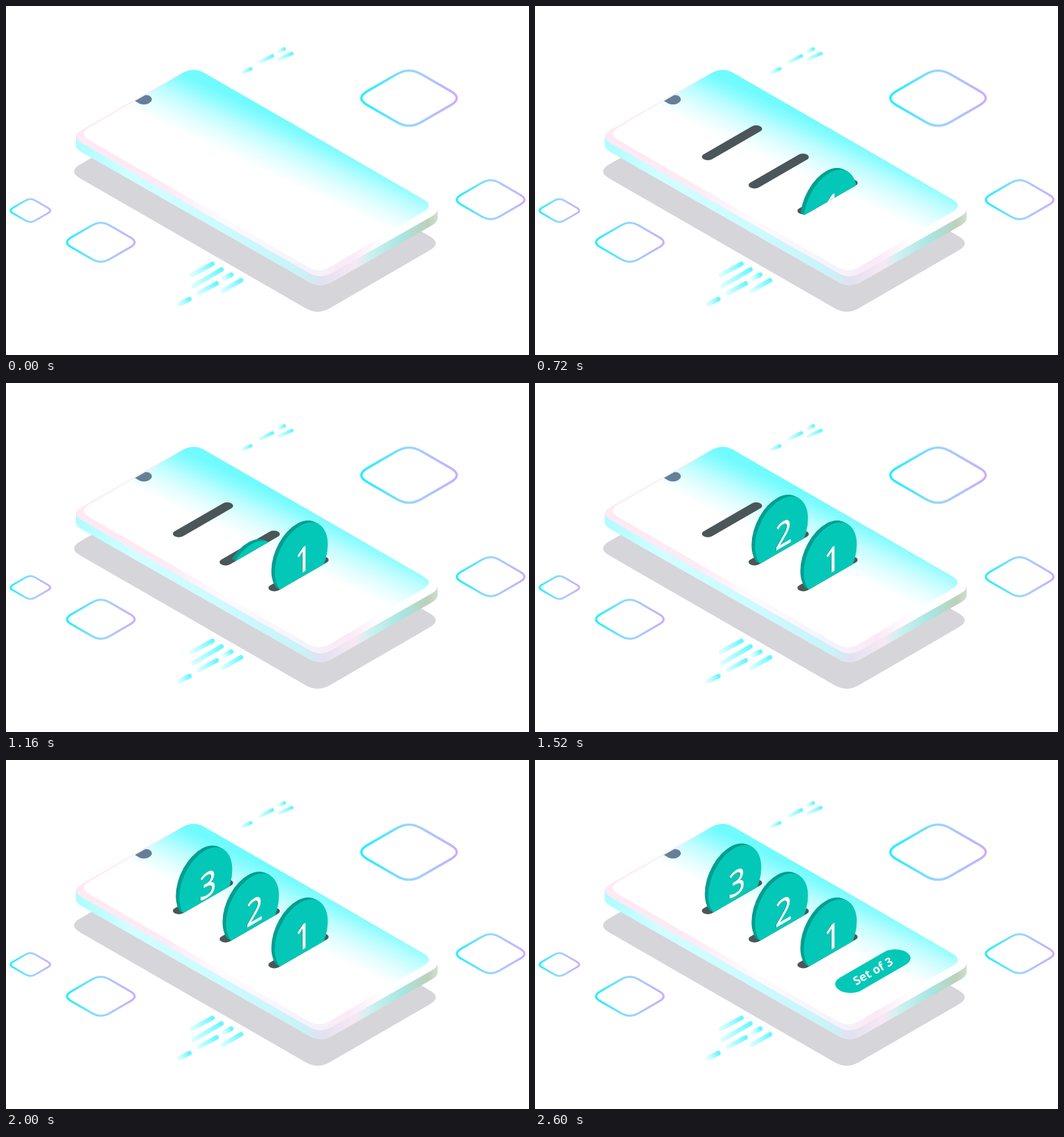
Recreate the animation shown at these times as an HTML page with a canvas. Size 750x500 px, loop 3.48 s.

```html
<!DOCTYPE html>
<html lang="en">
<head>
<meta charset="utf-8">
<title>Three coins</title>
<style>
  html, body { margin: 0; width: 100%; height: 100%; overflow: hidden; background: #fff; }
  canvas { display: block; width: 750px; height: 500px; }
</style>
</head>
<body>
<canvas id="stage" width="750" height="500"></canvas>
<script>
const canvas = document.getElementById('stage');
const ctx = canvas.getContext('2d');
const LOOP = 3480, STEP = 40, RISE = 560, HIDDEN = 78;
const FONT = '"Open Sans", "Noto Sans", sans-serif';
const SLOPE = 0.577, TEAL = '#04c8b7', RIM = '#039f91';

// Back to front: slot centre, label, start of the rise
const coins = [
  { x: 282.5, y: 196, label: '3', start: 1560 },
  { x: 349.5, y: 236.5, label: '2', start: 960 },
  { x: 419.5, y: 273.5, label: '1', start: 430 }
];

const progress = (t, start, length) => Math.min(1, Math.max(0, (t - start) / length));
const easeInOut = p => p < 0.5 ? 4 * p ** 3 : 1 - 4 * (1 - p) ** 3;

function gradient(c, x0, y0, x1, y1, stops) {
  const g = c.createLinearGradient(x0, y0, x1, y1);
  stops.forEach(([at, color]) => g.addColorStop(at, color));
  return g;
}

// Polygon whose corners are cut `cut` pixels along each edge and curved
function softPolygon(c, points, cut) {
  const n = points.length;
  const toward = ([ax, ay], [bx, by]) => {
    const k = cut / Math.hypot(bx - ax, by - ay);
    return [ax + (bx - ax) * k, ay + (by - ay) * k];
  };
  c.beginPath();
  points.forEach((p, i) => {
    c.lineTo(...toward(p, points[(i + n - 1) % n]));
    c.quadraticCurveTo(...p, ...toward(p, points[(i + 1) % n]));
  });
  c.closePath();
}

function diamond(c, x, y, half, cut, width) {
  const a = half + 0.43 * cut, b = a * SLOPE;
  softPolygon(c, [[x - a, y], [x, y - b], [x + a, y], [x, y + b]], cut);
  c.lineWidth = width;
  c.strokeStyle = gradient(c, x - half, y, x + half, y,
    [[0, '#1cf0ff'], [0.5, '#98d6ff'], [1, '#c9acff']]);
  c.stroke();
}

function dash(c, x0, y0, x1, y1, width) {
  c.lineWidth = width;
  c.lineCap = 'round';
  c.strokeStyle = gradient(c, x0, y0, x1, y1, [[0, '#d8feff'], [0.6, '#9afaff'], [1, '#66f6ff']]);
  c.beginPath();
  c.moveTo(x0, y0);
  c.lineTo(x1, y1);
  c.stroke();
}

// Pill lying flat on the screen plane
function flatPill(x, y, half, radius, color) {
  ctx.save();
  ctx.transform(0.866, -0.5, 0.866, 0.5, x, y);
  ctx.beginPath();
  ctx.roundRect(-half, -radius, 2 * half, 2 * radius, radius);
  ctx.restore();
  ctx.fillStyle = color;
  ctx.fill();
}

function drawPhone(c) {
  softPolygon(c, [[89, 237], [267, 134], [625, 340], [447, 443]], 20);
  c.fillStyle = '#d6d5da';
  c.fill();

  const top = [[92, 187], [269, 86], [627, 292], [451, 392]];
  c.fillStyle = gradient(c, 100, 0, 620, 0, [
    [0, '#aefcff'], [0.15, '#d2feff'], [0.4, '#cdfbff'], [0.62, '#c9f3f7'], [0.68, '#e2e1f0'],
    [0.77, '#f8e8f4'], [0.81, '#cdf1ef'], [0.9, '#a9e5e1'], [0.97, '#bdd0ba'], [1, '#cfe0d2']
  ]);
  for (let d = 13; d > 0; d--) {
    softPolygon(c, top.map(([x, y]) => [x, y + d]), 19);
    c.fill();
  }
  softPolygon(c, top, 19);
  c.fillStyle = gradient(c, 100, 0, 620, 0,
    [[0, '#ffe9f3'], [0.25, '#fdeaf4'], [0.4, '#fffafd'], [0.65, '#f4f2fa'], [0.75, '#fbe9f6'], [0.85, '#fff'], [1, '#fff']]);
  c.fill();

  softPolygon(c, [[104, 183], [269, 87], [614, 286], [449, 383]], 18);
  c.fillStyle = '#fff';
  c.fill();
  c.save();
  c.clip();
  c.beginPath();
  [[160, 151], [269, 80], [625, 285], [548, 325]].forEach(p => c.lineTo(...p));
  c.fillStyle = gradient(c, 430, 178, 397, 249,
    [[0, '#70fbff'], [0.18, '#8cfcff'], [0.42, '#bcfdff'], [0.7, '#e2feff'], [1, '#fff']]);
  c.fill();
  c.restore();

  c.fillStyle = '#667f98';
  c.beginPath();
  c.moveTo(185, 136);
  c.lineTo(200, 127.5);
  c.bezierCurveTo(206, 127.5, 210, 131, 209, 135);
  c.bezierCurveTo(207, 141, 196, 143, 190, 139);
  c.closePath();
  c.fill();
}

function drawScenery(c) {
  c.fillStyle = '#fff';
  c.fillRect(0, 0, 750, 500);
  diamond(c, 578, 132, 68.5, 20, 3.2);
  diamond(c, 695, 277.5, 48.5, 14, 3);
  diamond(c, 136, 338.5, 48.5, 14, 3);
  diamond(c, 35, 293, 28.5, 8, 2.6);
  [[340, 95, 351, 90], [365, 80, 382, 71.5], [392, 65, 399, 61.5], [392, 76, 410, 68]]
    .forEach(d => dash(c, ...d, 5));
  drawPhone(c);
  [[267, 385, 296, 369.5], [269, 401, 309, 377.5], [313, 390, 323, 385],
   [277, 411, 302, 397.5], [311, 408, 337, 393], [249, 427, 263, 420]]
    .forEach(d => dash(c, ...d, 6.5));
}

function disc(x, y, color) {
  ctx.save();
  ctx.transform(38, -20, 0, 48, x, y);
  ctx.beginPath();
  ctx.arc(0, 0, 1, 0, Math.PI * 2);
  ctx.restore();
  ctx.fillStyle = color;
  ctx.fill();
}

// Keeps what rises above the slot's front edge
function clipAboveSlot(x, y) {
  ctx.beginPath();
  ctx.moveTo(x - 60, y + 7 + 60 * SLOPE);
  ctx.lineTo(x + 60, y + 7 - 60 * SLOPE);
  ctx.lineTo(x + 60, y - 150);
  ctx.lineTo(x - 60, y - 150);
  ctx.clip();
}

function drawCoin({ x, y, label, start }, t) {
  const p = easeInOut(progress(t, start, RISE));
  if (p === 0) return;
  const cx = x + 4, cy = y - 22 + HIDDEN * (1 - p);
  // Layers from the back face to the front one
  for (let d = 5; d >= 0; d--) {
    ctx.save();
    ctx.translate(-d, -d / 2);
    clipAboveSlot(x, y);
    disc(cx, cy, d ? RIM : TEAL);
    ctx.restore();
  }
  ctx.save();
  clipAboveSlot(x, y);
  ctx.transform(0.866, -0.5, 0, 1, cx + 3, cy + 2);
  ctx.font = '49px ' + FONT;
  ctx.textAlign = 'center';
  ctx.textBaseline = 'alphabetic';
  ctx.fillStyle = '#078d82';
  ctx.fillText(label, -1.5, 16.5);
  ctx.fillStyle = ctx.strokeStyle = '#fff';
  ctx.lineWidth = 0.8;
  ctx.fillText(label, 0, 17);
  ctx.strokeText(label, 0, 17);
  ctx.restore();
}

function drawButton(alpha) {
  if (alpha === 0) return;
  ctx.save();
  ctx.globalAlpha = alpha;
  ctx.translate(484.5, 302.5);
  flatPill(0, 0, 55, 18, TEAL);
  ctx.rotate(-Math.PI / 6);
  ctx.font = 'bold 17px ' + FONT;
  ctx.textAlign = 'center';
  ctx.textBaseline = 'alphabetic';
  ctx.fillStyle = '#fff';
  ctx.fillText('Set of 3', 0, 6);
  ctx.restore();
}

const scenery = document.createElement('canvas');
scenery.width = 750;
scenery.height = 500;
drawScenery(scenery.getContext('2d'));

const origin = performance.now();

function render() {
  const t = Math.floor((performance.now() - origin) % LOOP / STEP) * STEP;
  ctx.drawImage(scenery, 0, 0);
  ctx.globalAlpha = progress(t, 120, 320);
  coins.forEach(({ x, y }) => flatPill(x, y, 47, 7, '#4b5658'));
  ctx.globalAlpha = 1;
  coins.forEach(coin => drawCoin(coin, t));
  drawButton(progress(t, 2280, 320));
  requestAnimationFrame(render);
}
render();
</script>
</body>
</html>
```
